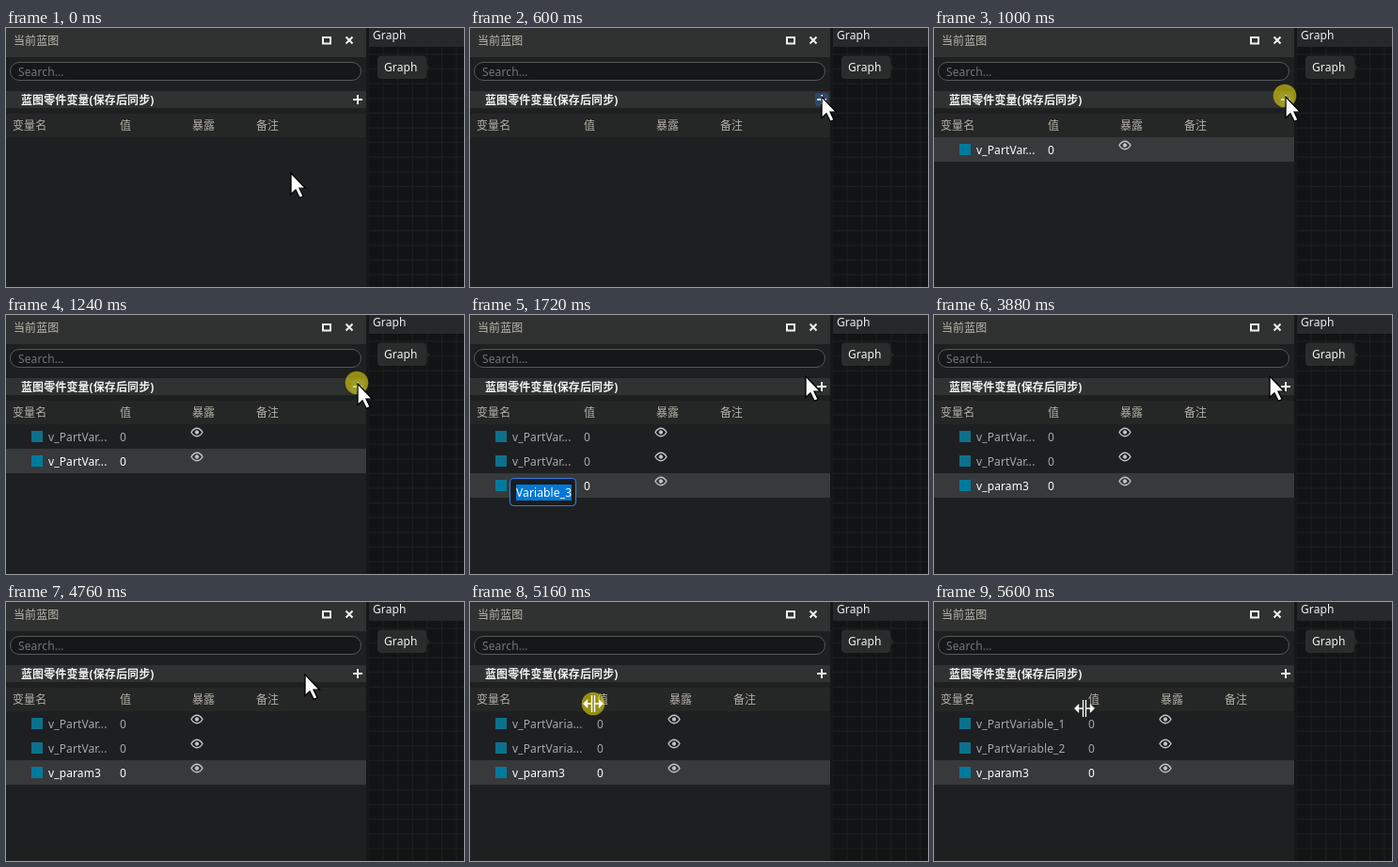
These frames come from a looping animation (487x275 px, 6480 ms). An HTML page:

```html
<!DOCTYPE html>
<html lang="zh-CN">
<head>
<meta charset="utf-8">
<title>Blueprint variables</title>
<style>
  html, body { margin: 0; width: 100%; height: 100%; overflow: hidden; background: #1e1f21; }
  svg { display: block; width: 100%; height: 100%; }
  text { font: 12px "Noto Sans", "Noto Sans CJK SC", "Noto Sans CJK", sans-serif; letter-spacing: .12px; white-space: pre; }
  .bold { font-weight: 700; letter-spacing: .1px; }
</style>
</head>
<body>
<svg id="stage" viewBox="0 0 487 275">
  <defs>
    <pattern id="grid" width="15.6" height="15.6" patternUnits="userSpaceOnUse" x="386" y="13">
      <path d="M15 0V15.6M0 15H15.6" stroke="#1e1f20" fill="none"/>
    </pattern>
    <path id="arrow" d="M0 0V22.5L5 17.8L9.2 26.3L13 24.5L9 16.2H15.5Z" transform="translate(1 1)" fill="#fff" stroke="#000" stroke-width="1.3"/>
    <path id="resize" d="M-1.5-9V9M1.5-9V9M-7 0H-2M2 0H7M-10 0L-6.5-3.5V3.5ZM10 0L6.5-3.5V3.5Z" fill="#fff" stroke="#fff" stroke-width="1.3"/>
    <g id="eye" fill="none" stroke="#c4c4c4" stroke-width="1.4">
      <path d="M-6 0Q-3.5-4.2 0-4.2T6 0Q3.5 4.2 0 4.2T-6 0Z"/>
      <circle r="1.7" fill="#c4c4c4" stroke-width="1"/>
    </g>
  </defs>

  <rect width="384" height="275" fill="#1e1f21"/>
  <rect width="383" height="31" fill="#303231"/>
  <text x="8" y="17.5" fill="#b9b7b0">当前蓝图</text>
  <rect x="337" y="10" width="8" height="6.5" fill="none" stroke="#f0f0f0" stroke-width="2"/>
  <path d="M361.5 9.5L368.5 16.5M368.5 9.5L361.5 16.5" stroke="#f0f0f0" stroke-width="2"/>
  <rect x="4.5" y="36.5" width="373" height="19" rx="9.5" fill="#161718" stroke="#565758"/>
  <text x="13" y="51" fill="#747474">Search...</text>
  <rect y="67" width="383" height="18" fill="#303231"/>
  <text class="bold" x="16" y="80.5" fill="#f2f2f2">蓝图零件变量(保存后同步)</text>
  <rect y="91" width="383" height="25" fill="#252726"/>
  <text x="7" y="107.5" fill="#b4b1a9">变量名</text>

  <rect x="383" width="3" height="275" fill="#161718"/>
  <rect x="386" width="101" height="275" fill="#121314"/>
  <rect x="386" y="20" width="101" height="255" fill="url(#grid)"/>
  <rect x="386" width="101" height="20" fill="#262829"/>
  <text x="390" y="12" fill="#eee">Graph</text>
  <path d="M446 37L451 42L446 47Z" fill="#232526"/>
  <rect x="395" y="29.5" width="52" height="24.5" rx="4" fill="#2a2c2c"/>
  <text x="402" y="46" fill="#f0f0f0">Graph</text>

  <g id="live"></g>
</svg>
<script>
const LOOP = 6480, STEP = 40, NAME_X = 45, EDIT_X = 49;
const live = document.getElementById('live');
const ctx = document.createElement('canvas').getContext('2d');
ctx.font = '12px "Noto Sans", "Noto Sans CJK SC", sans-serif';

// [time, x, y]
const pointer = [
  [160, 302, 153], [240, 317, 132], [320, 346, 103], [400, 373, 77], [480, 385, 66],
  [600, 373, 72], [1560, 373, 72], [1600, 375, 70], [1720, 356, 64], [4720, 356, 64],
  [4760, 317, 76], [4800, 234, 98], [4880, 137, 114], [4960, 117, 108],
  [5120, 117, 108], [5160, 131, 108], [5320, 146, 110], [5520, 160, 113]
];
const presses = [[1000, 1040], [1240, 1320], [5160, 5600]];
const added = [800, 1040, 1320];
const committed = [1000, 1240, 3880];
const typed = [
  [2320, 'v'], [2520, 'v_'], [2840, 'v_p'], [2920, 'v_pa'],
  [3120, 'v_para'], [3160, 'v_param'], [3680, 'v_param3']
];
const caretOff = [[1600, 2120], [3480, 3680]];

const within = (t, spans) => spans.some(([a, b]) => t >= a && t < b);
const textWidth = s => ctx.measureText(s).width + s.length * .12;
const text = (x, y, s, fill) => `<text x="${x}" y="${y}" fill="${fill}">${s}</text>`;
const rect = (x, y, w, h, fill, extra = '') =>
  `<rect x="${x}" y="${y}" width="${w}" height="${h}" fill="${fill}" ${extra}/>`;
const use = (id, x, y) => `<use href="#${id}" x="${x}" y="${y}"/>`;

function pointerAt(t) {
  const i = pointer.findIndex(k => k[0] > t);
  if (i === 0) return pointer[0].slice(1);
  if (i < 0) return pointer[pointer.length - 1].slice(1);
  const [t0, x0, y0] = pointer[i - 1], [t1, x1, y1] = pointer[i];
  const p = (t - t0) / (t1 - t0);
  return [Math.round(x0 + (x1 - x0) * p), Math.round(y0 + (y1 - y0) * p)];
}

function elide(s, room) {
  if (textWidth(s) <= room) return s;
  while (textWidth(s + '...') > room) s = s.slice(0, -1);
  return s + '...';
}

function editor(t, i, y) {
  const entry = i === 2 && typed.filter(k => k[0] <= t).pop();
  const value = entry ? entry[1] : `Variable_${i + 1}`;
  const end = Math.round(EDIT_X + textWidth(value));
  let out = rect(42.5, y + 5.5, 70, 29, '#1a1b1d', 'rx="4" stroke="#2f7de0" stroke-width="1.2"');
  if (!entry) out += rect(EDIT_X, y + 12, end - EDIT_X, 17, '#0078d7');
  out += text(EDIT_X, y + 25, value, '#fff');
  if (!within(t, caretOff)) out += rect(end, y + 12, 1, 17, '#fff');
  return out;
}

function row(t, i, shift, selected) {
  const y = 116 + i * 26;
  const ink = selected ? '#fff' : '#aaa9a6';
  const editing = t < committed[i];
  const name = i === 2 ? 'v_param3' : `v_PartVariable_${i + 1}`;
  return (selected ? rect(0, y, 383, 26, '#38393b') : '') +
    rect(27, y + 7, 12, 12, selected ? '#007a9c' : '#0d718c') +
    (editing ? '' : text(NAME_X, y + 18, elide(name, 66 + shift), ink)) +
    text(121 + shift, y + 18, '0', ink) +
    use('eye', 203 + shift, y + 8.5) +
    (editing ? editor(t, i, y) : '');
}

function draw(t) {
  const [x, y] = pointerAt(t);
  const shift = t >= 5160 ? x - 117 : 0;
  const hover = x >= 367 && x <= 381 && y >= 69 && y <= 84;
  const count = added.filter(a => a <= t).length;
  let out = '';
  if (hover) out += rect(367, 69, 14, 14, '#2c4870', 'rx="3"');
  out += '<path d="M369 76H379M374 71V81" stroke="#f0f0f0" stroke-width="2"/>';
  [[121, '值'], [198, '暴露'], [266, '备注']].forEach(([cx, s]) => {
    out += text(cx + shift, 107.5, s, '#b4b1a9');
  });
  for (let i = 0; i < count; i++) out += row(t, i, shift, i === count - 1);
  if (within(t, presses)) out += `<circle cx="${x}" cy="${y}" r="12.3" fill="#d6ca0c" opacity=".65"/>`;
  out += use(t >= 4960 ? 'resize' : 'arrow', x, y);
  live.innerHTML = out;
}

let last = -1;
function tick(now) {
  const t = Math.floor(now % LOOP / STEP) * STEP;
  if (t !== last) draw(last = t);
  requestAnimationFrame(tick);
}
draw(0);
requestAnimationFrame(tick);
</script>
</body>
</html>
```
